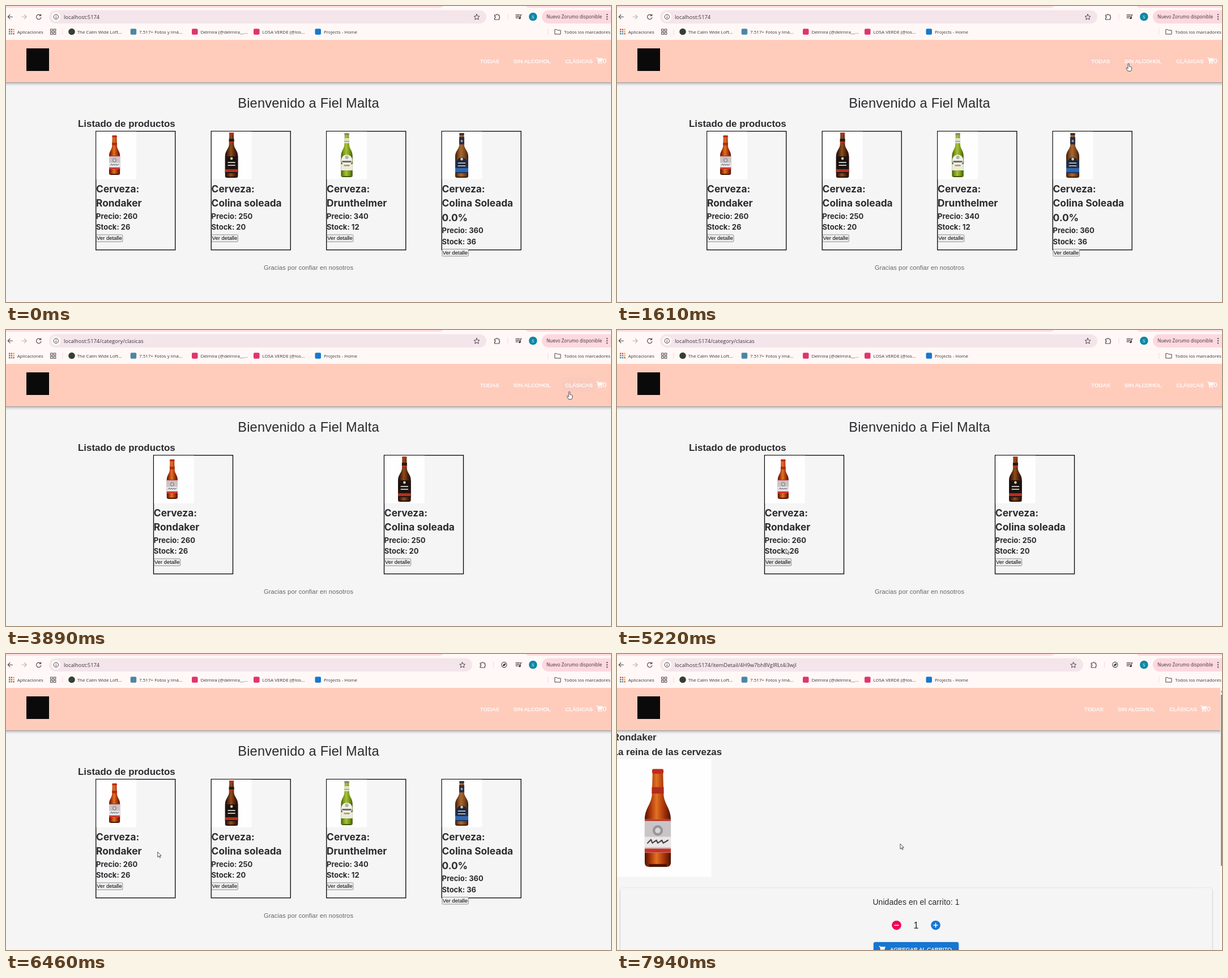
An HTML page that plays this animation: 1068 by 524 pixels, repeating every 8000 ms.

```html
<!DOCTYPE html>
<html lang="es">
<head>
<meta charset="utf-8">
<title>Fiel Malta</title>
<style>
html, body { margin: 0; width: 100%; height: 100%; overflow: hidden; background: #f5f5f5; }
svg { display: block; position: absolute; left: 0; top: 0; }
text { white-space: pre; }
.ui { font-family: "Open Sans", "Noto Sans", sans-serif; fill: #3a3538; }
.page { font-family: "Liberation Sans", Arial, sans-serif; fill: #2b2b2f; }
.light { font-family: "Liberation Sans", Arial, sans-serif; fill: #fff; stroke: #fff; stroke-width: .25px; }
.card { font-family: Inter, sans-serif; font-weight: 700; fill: #2b2b2f; }
</style>
</head>
<body>
<svg id="stage" width="1068" height="524" viewBox="0 0 1068 524"></svg>
<script>
const LOOP = 8000;
const stage = document.getElementById('stage');
const $ = id => document.getElementById(id);

const text = (x, y, s, size, cls, extra = '') =>
  `<text x="${x}" y="${y}" font-size="${size}" class="${cls}" ${extra}>${s}</text>`;
const rect = (x, y, w, h, fill, extra = '') =>
  `<rect x="${x}" y="${y}" width="${w}" height="${h}" fill="${fill}" ${extra}/>`;
const circle = (x, y, r, fill, extra = '') =>
  `<circle cx="${x}" cy="${y}" r="${r}" fill="${fill}" ${extra}/>`;
const path = (d, fill, extra = '') => `<path d="${d}" fill="${fill}" ${extra}/>`;
const line = (d, color, w = 1.1) =>
  path(d, 'none', `stroke="${color}" stroke-width="${w}" stroke-linecap="round" stroke-linejoin="round"`);
const group = (x, y, inner, id = '') =>
  `<g ${id && `id="${id}"`} transform="translate(${x} ${y})">${inner}</g>`;

// ---- products ----
const products = [
  { name: ['Rondaker'], price: 260, stock: 26, cx: 33.5, top: 8, h: 70, w: 9.6, glass: 'amber', cap: '#c22a1c',
    label: w => rect(-4.4, 13, 8.8, 4.6, '#b32a1a') + rect(-w, 36, 2 * w, 24, '#c9c5c7') +
      rect(-w, 36, 2 * w, 1.2, '#b9312a') + circle(0, 44, 3.8, '#98949a') + circle(0, 44, 2, '#d8d5d6') +
      rect(-w, 48.5, 2 * w, 7.5, '#e9e6e8') + line('M-7.5 53L-5 50.5-4 53-1 51 0 53 3 51 4 53 7.5 51', '#4a4248', .9) +
      rect(-w, 57, 2 * w, 2.8, '#cf3122') },
  { name: ['Colina soleada'], price: 250, stock: 20, cx: 36.5, top: 3, h: 80, w: 11.3, glass: 'brown', cap: '#b8321f',
    label: w => rect(-4.5, 11, 9, 5, '#2a1712') + rect(-4.5, 16, 9, 2, '#c33a22') +
      rect(-w, 42, 2 * w, 30, '#231310') + circle(0, 53, 10, '#171211') +
      circle(0, 46, 2.4, '#d8c49a') + line('M-6 53H6M-6 58H6', '#c9c0b4', 1.8) +
      rect(-w, 65, 2 * w, 5, '#b5301f') },
  { name: ['Drunthelmer'], price: 340, stock: 12, cx: 36.5, top: 4, h: 78, w: 10.2, glass: 'green', cap: '#8a8a63',
    label: w => rect(-4.3, 9, 8.6, 9, '#dfe2cc') + rect(-4.3, 14, 8.6, 1.2, '#b8873d') +
      circle(0, 48, 9.8, '#eef0e7') + circle(0, 43, 3, '#b0b4a8') +
      rect(-8, 49, 16, 3, '#6b7068') + rect(-w, 55, 2 * w, 11, '#e9ebe2') +
      rect(-5, 56, 10, 2.5, '#cf8a3a') },
  { name: ['Colina Soleada', '0.0%'], price: 360, stock: 36, cx: 36, top: 4, h: 79, w: 11.5, glass: 'tan', cap: '#2c2a38',
    label: w => rect(-4.5, 7, 9, 13, '#2a3044') + circle(0, 14, 2, '#9aa0b0') +
      rect(-w, 48, 2 * w, 23, '#23324f') + circle(0, 52, 9, '#202737') + circle(0, 46, 2.4, '#cfc9b8') +
      line('M-6 53H6M-6 58H6', '#a9b2c2', 1.8) + rect(-w, 62, 2 * w, 7, '#2f66b0') }
];
// edge, body and highlight of each bottle
const glasses = {
  amber: ['#4a1204', '#a53208', '#e27222'], brown: ['#1f0d06', '#4d230d', '#8f4c1c'],
  green: ['#42590b', '#769612', '#a9c03c'], tan: ['#3a1b0b', '#7a431b', '#a8682e']
};
const stop = (at, color) => `<stop offset="${at}" stop-color="${color}"/>`;
const defs = '<defs>' + Object.entries(glasses).map(([id, [edge, body, shine]]) =>
  `<linearGradient id="${id}">${stop(0, edge)}${stop(.2, body)}${stop(.45, shine)}${stop(.75, body)}${stop(1, edge)}</linearGradient>`).join('') +
  `<linearGradient id="shade" x2="0" y2="1"><stop offset="0" stop-color="#000" stop-opacity=".36"/><stop offset=".35" stop-color="#000" stop-opacity=".13"/><stop offset="1" stop-color="#000" stop-opacity="0"/></linearGradient>
  <filter id="soft" x="-5%" y="-20%" width="110%" height="140%"><feDropShadow dx="0" dy=".8" stdDeviation="1.2" flood-opacity=".42"/></filter></defs>`;

function bottle({ h, w, glass, cap, label }) {
  const d = `M-3.8 1L-4.3 ${h * .26}C-4.6 ${h * .36} ${-w} ${h * .4} ${-w} ${h * .52}V${h - 3}Q${-w} ${h} ${3 - w} ${h}` +
    `H${w - 3}Q${w} ${h} ${w} ${h - 3}V${h * .52}C${w} ${h * .4} 4.6 ${h * .36} 4.3 ${h * .26}L3.8 1Z`;
  return path(d, `url(#${glass})`) + label(w) + rect(3 - w, h - 2, 2 * w - 6, 2, glasses[glass][0]) +
    rect(-4.2, 0, 8.4, 3.4, cap, 'rx="1.2"');
}

function card(p, i) {
  const shift = (p.name.length - 1) * 25.5;
  const names = ['Cerveza:', ...p.name].map((s, k) => text(1, 330 + 25.4 * k, s, 17.3, 'card')).join('');
  return group(0, 0,
    rect(.65, 221.75, 140, 210, 'none', 'stroke="#000" stroke-width="1.3"') +
    rect(1.3, 222.4, 70.6, 84.4, '#fefefe') +
    group(p.cx, 221 + p.top, bottle(p)) + names +
    text(1, 376.6 + shift, 'Precio: ' + p.price, 13, 'card') +
    text(1, 396.4 + shift, 'Stock: ' + p.stock, 13, 'card') +
    rect(1.4, 404.9 + shift, 46.4, 12.5, '#efefef', `id="btn${i}" rx="1.5" stroke="#767676" stroke-width=".8"`) +
    text(2.2, 414.3 + shift, 'Ver detalle', 9.4, 'page', 'style="fill:#000"'), 'card' + i);
}

// ---- browser frame ----
const ink = '#474246';
const star = 'M0-5L1.5-1.6 5-1.3 2.4 1.1 3.2 4.6 0 2.7-3.2 4.6-2.4 1.1-5-1.3-1.5-1.6Z';
const appColors = ['#e0483e', '#e0483e', '#f0a92c', '#3c9a50', '#4a86e0', '#f0a92c', '#3c9a50', '#4a86e0', '#e0483e'];
const bookmark = (x, color, label) =>
  rect(x, 40.2, 10.5, 10.5, color, 'rx="2"') + text(x + 15.4, 48.6, label, 8, 'ui');

function browser() {
  return rect(0, 0, 1068, 60, '#fff8f6') +
    path('M0 0H771Q770 3 765 3H0ZM918 0H1068V3H924Q919 3 918 0Z', '#fddbe1') +
    line('M11.5 19.2H3.5M7 15.5L3.3 19.2 7 22.9', ink) +
    line('M28 19.2H36M32.5 15.5L36.2 19.2 32.5 22.9', '#b5afb1') +
    line('M61.2 16.8A4.2 4.2 0 1 0 61.9 20.4M61.7 14.5V17.3H58.8', ink) +
    rect(76, 7.5, 772, 23.5, '#f4e5eb', 'id="bar" rx="11.7"') +
    circle(88.3, 19.2, 8.3, '#fff8f6') + circle(88.3, 19.2, 4.2, 'none', `stroke="${ink}"`) +
    line('M88.3 19V21.3M88.3 17V17.1', ink) +
    text(102, 22.7, '', 9.4, 'ui', 'id="url"') +
    group(0, 0,
      group(831, 19.5, line(star, ink, 1)) +
      group(867, 19, line('M-4.5-3H-1.8A1.5 1.5 0 0 1 1.2-3H3.6V-.3A1.5 1.5 0 0 1 3.6 2.5V5H-4.5V2.3A1.5 1.5 0 0 0-4.5-.7Z', ink, 1.2)) +
      rect(885.3, 13.5, 1, 11, '#f6d9df'), 'tools') +
    group(879.3, 19, circle(0, 0, 4.6, 'none', `stroke="${ink}" stroke-width="1.1"`) +
      path('M-2.5 2.6Q-2.6-2.4 2.8-2.6 2.8 2.6-2.5 2.6Z', ink), 'saver') +
    line('M900 15.7H906.5M900 18.3H906.5M900 20.9H903.5M908.3 20.8V15.7H910', ink, 1.2) + circle(906.8, 21.3, 1.9, ink) +
    circle(930.3, 19, 7.3, '#0c88a6') + text(930.3, 21.8, 'S', 8, 'ui', 'text-anchor="middle" style="fill:#fff"') +
    rect(946, 7.5, 140, 23.5, '#fdd8df', 'rx="11.7"') +
    text(954, 22, 'Nuevo Zorumo disponible', 8.1, 'ui') +
    [15.2, 19.2, 23.2].map(y => circle(1061, y, 1.1, ink)).join('') +
    appColors.map((c, i) => rect(5 + i % 3 * 3.7, 40.5 + Math.floor(i / 3) * 3.7, 2.4, 2.4, c)).join('') +
    text(19.7, 48.6, 'Aplicaciones', 8, 'ui') +
    [0, 1, 2, 3].map(i => rect(78.6 + i % 2 * 5.6, 41 + (i >> 1) * 5.6, 3.6, 3.6, 'none', `stroke="${ink}"`)).join('') +
    rect(99.3, 40, 1, 11, '#f6d9df') + rect(956.3, 40, 1, 11, '#f6d9df') +
    circle(116, 45.5, 5.8, '#343f36') + text(125.7, 48.6, 'The Calm Wide Loft...', 8, 'ui') +
    bookmark(219.7, '#4a87a5', '7.517+ Fotos y Imá...') +
    bookmark(328, '#e0346f', 'Delmira (@delmira__...') +
    bookmark(437, '#e0346f', 'LOSA VERDE (@los...') +
    bookmark(545.5, '#1478d0', 'Projects - Home') +
    line('M968.8 49.5V41.6H972.4L973.7 43H979V49.5Z', ink, 1) +
    text(985.3, 48.6, 'Todos los marcadores', 8, 'ui');
}

// ---- page parts ----
const cart = 'M0 0H2.2L2.7 1.3H11.3L9.8 6.4H3.7L4 7.5H9.5V8.6H3.1L1.4 1.2H0ZM4.3 9A1.1 1.1 0 1 1 4.2 9ZM8.9 9A1.1 1.1 0 1 1 8.8 9Z';
const nav = [
  { x: 832, w: 44, tx: 836.8, s: 'TODAS' },
  { x: 890, w: 77, tx: 895.8, s: 'SIN ALCOHOL' },
  { x: 982, w: 59, tx: 987.2, s: 'CLÁSICAS' }
];

function header() {
  return rect(0, 135, 1068, 7, 'url(#shade)', 'id="shadow"') + rect(0, 60, 1068, 75, '#ffccbc', 'id="band"') +
    rect(36, 75, 40, 40, '#0b0a0a') +
    group(0, 0, nav.map((n, i) =>
      rect(n.x, 84, n.w, 26, '#1976d2', `id="nav${i}" rx="2.8" opacity="0"`) +
      text(n.tx, 100.6, n.s, 9.85, 'light')).join('') +
      group(1042.3, 91.3, path(cart, '#fff')) + text(1053.2, 101, '0', 11.5, 'light'), 'menu');
}

function listing() {
  return text(534, 180, 'Bienvenido a Fiel Malta', 23.64, 'page', 'text-anchor="middle" letter-spacing=".17"') +
    text(127, 213.8, 'Listado de productos', 16.9, 'page', 'font-weight="700"') +
    products.map(card).join('') +
    text(534, 467.4, 'Gracias por confiar en nosotros', 11.12, 'page', 'text-anchor="middle" letter-spacing=".1" style="fill:#666"');
}

function detail() {
  return text(-8.3, 153.3, 'Rondaker', 16.9, 'page', 'font-weight="700"') +
    text(-8.3, 179, 'La reina de las cervezas', 16.9, 'page', 'font-weight="700"') +
    rect(0, 186, 166.5, 208.5, '#fefefe') +
    `<g transform="translate(72 203.5) scale(2.4 2.475)">${bottle(products[0])}</g>` +
    rect(6, 414.3, 1044.5, 150, '#f5f5f5', 'rx="5" filter="url(#soft)"') +
    text(528, 444.4, 'Unidades en el carrito: 1', 13.9, 'page', 'text-anchor="middle" letter-spacing=".1"') +
    circle(493.5, 480.2, 8.3, '#f50057') + line('M490 480.2H497', '#fff', 1.6) +
    circle(562.5, 480.2, 8.3, '#1976d2') + line('M559 480.2H566M562.5 476.7V483.7', '#fff', 1.6) +
    text(528, 486, '1', 16.7, 'page', 'text-anchor="middle"') +
    rect(453, 510, 150, 26, '#1976d2', 'rx="3" filter="url(#soft)"') +
    group(462.5, 517, path(cart, '#fff')) +
    text(482, 526, 'AGREGAR AL CARRITO', 9.75, 'light');
}

const scrollbar = rect(1065, 60, 3, 464, '#fafafa') + rect(1066, 72, 2, 303, '#8c8c8c') + path('M1066 68L1068 64V68Z', '#777');
const arrow = 'M0 0V9.2L2.2 7.2 3.6 10.4 5 9.8 3.6 6.7H6.4Z';
const hand = 'M-1.1 .9a1.1 1.1 0 0 1 2.2 0V5l3.4 .9q1.3 .4 1.1 1.8l-.6 3.5-1 2.1H-1.2L-4 8.6q-.6-1 .2-1.4 .8-.3 1.6 .7l1.1 1.1Z';

stage.innerHTML = defs + rect(0, 0, 1068, 524, '#f5f5f5') +
  `<g id="list">${listing()}</g><g id="detail">${detail()}</g>` + header() + browser() +
  `<g id="scroll">${scrollbar}</g>` + path(arrow, '#fff', 'id="cursor" stroke="#25252a" stroke-width=".8" stroke-linejoin="round"');

// ---- timeline ----
const row = [158.1, 361.6, 565.1, 768.5], pair = [259.85, 666.85];
const place = (ids, xs) => products.map((_, i) => xs[ids.indexOf(i)]);
const all = place([0, 1, 2, 3], row);
const pages = [[0, all], [2360, place([2, 3], pair)], [3890, place([0, 1], pair)], [6100, all], [7450, null]];
const host = 'localhost:5174';
const urls = [[0, ''], [2070, '/category/premium'], [3600, '/category/clasicas'], [5890, ''], [7250, '/itemDetail/4H9w7bh8VgIRLt4i3wjI']];
const at = (steps, t) => steps.filter(s => s[0] <= t).pop()[1];

// time, x, y of the pointer tip
const moves = [
  [130, 975, 514], [420, 1008, 330], [680, 975, 170], [930, 861, 96], [1250, 850, 98], [1500, 866, 99],
  [1610, 903, 102], [1800, 909, 101], [2200, 912, 100], [2359, 912, 100], [2360, 922, 101], [2499, 922, 101],
  [2500, 1018, 112], [2720, 1030, 113], [3070, 1021, 101], [3740, 1021, 100], [3889, 1021, 100], [3890, 995, 109],
  [4120, 860, 190], [4670, 297, 408], [5219, 297, 408], [5220, 299, 388], [5560, 43, 80], [5750, 39, 73],
  [5890, 40, 74], [6460, 268, 350], [6660, 225, 428], [6800, 203, 411], [6990, 197, 408], [7250, 197, 408], [7940, 500, 336]
];

function pointer(t) {
  const i = moves.findIndex(m => m[0] > t);
  if (i < 0) return moves[moves.length - 1].slice(1);
  if (i === 0) return null;
  const [a, b] = [moves[i - 1], moves[i]], k = (t - a[0]) / (b[0] - a[0]);
  return [a[1] + (b[1] - a[1]) * k, a[2] + (b[2] - a[2]) * k];
}

function hit(t) {
  const p = pointer(t);
  if (!p) return '';
  const inside = (x, y, w, h) => p[0] >= x && p[0] <= x + w && p[1] >= y && p[1] <= y + h;
  const n = nav.findIndex(b => inside(b.x, 84, b.w, 30));
  if (n >= 0) return 'nav' + n;
  if (inside(15, 72, 61, 43)) return 'logo';
  const xs = at(pages, t) || [];
  const c = xs.findIndex((x, i) => x && inside(x + 1, 404.5 + (products[i].name.length - 1) * 25.5, 47, 13));
  return c >= 0 ? 'btn' + c : '';
}

const show = (id, on) => $(id).setAttribute('display', on ? 'inline' : 'none');

function draw(t) {
  const xs = at(pages, t), slim = t >= 5890;
  $('url').textContent = host + at(urls, t);
  $('bar').setAttribute('width', slim ? 747 : 772);
  $('tools').setAttribute('transform', `translate(${slim ? -25.3 : 0} 0)`);
  show('saver', slim);
  show('list', xs);
  show('detail', !xs);
  show('scroll', !xs);
  $('band').setAttribute('width', xs ? 1068 : 1065);
  $('shadow').setAttribute('width', xs ? 1068 : 1065);
  $('menu').setAttribute('transform', `translate(${xs ? 0 : -12} 0)`);

  const recent = [0, 50, 100, 150, 200].map(d => hit(t - d));
  const glow = id => recent.filter(r => r === id).length / recent.length;
  nav.forEach((_, i) => $('nav' + i).setAttribute('opacity', .02 * glow('nav' + i)));
  products.forEach((_, i) => {
    const x = xs && xs[i];
    show('card' + i, x);
    if (x) $('card' + i).setAttribute('transform', `translate(${x} 0)`);
    const v = 239 - 10 * glow('btn' + i);
    $('btn' + i).setAttribute('fill', `rgb(${v},${v},${v})`);
  });

  const p = pointer(t);
  show('cursor', p);
  if (p) {
    $('cursor').setAttribute('d', recent[0] ? hand : arrow);
    $('cursor').setAttribute('transform', `translate(${p[0]} ${p[1]})`);
  }
}

const start = performance.now();
function tick() {
  draw((performance.now() - start) % LOOP);
  requestAnimationFrame(tick);
}
tick();
</script>
</body>
</html>
```
